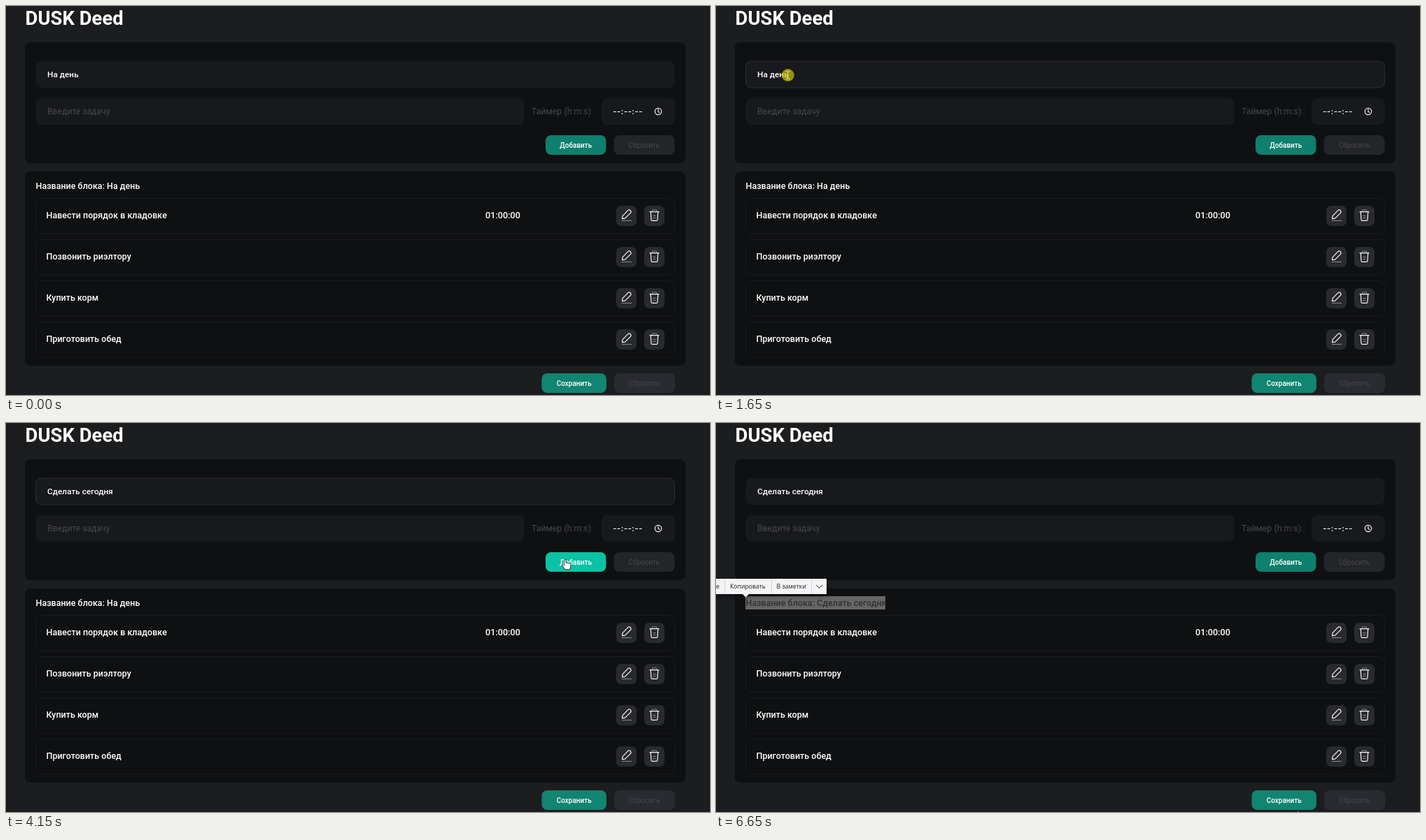
Animation, 1006 px wide and 557 px high, one loop 6.72 s. Source, as an HTML page:

```html
<!DOCTYPE html>
<html lang="ru">
<head>
<meta charset="utf-8">
<title>DUSK Deed</title>
<style>
html, body { margin: 0; width: 100%; height: 100%; overflow: hidden; background: #1c1d1f; }
svg { display: block; width: 100%; height: 100%; }
text { font-family: Roboto, "Noto Sans", sans-serif; font-weight: 500; fill: #fff; white-space: pre; }
.bar text { font-family: "Open Sans", "Noto Sans", sans-serif; font-weight: 400; font-size: 8.7px; fill: #1c1c1c; }
.bar { filter: drop-shadow(0 2px 3px rgba(0, 0, 0, .5)); }
.line { fill: none; stroke: #f4f4f4; stroke-width: 1.2; stroke-linecap: round; stroke-linejoin: round; }
.dim { fill: none; stroke: #8b8c8f; stroke-width: 1; }
</style>
</head>
<body>
<svg id="stage" viewBox="0 0 1006 557"></svg>
<script>
const LOOP = 6720;
const OLD = 'На день', NEW = 'Сделать сегодня';
const stage = document.getElementById('stage');

const rect = (x, y, w, h, fill, r = 8, more = '') =>
  `<rect x="${x}" y="${y}" width="${w}" height="${h}" rx="${r}" fill="${fill}" ${more}/>`;
const text = (x, y, size, str, more = '') =>
  `<text x="${x}" y="${y}" font-size="${size}" ${more}>${str}</text>`;
const button = (x, y, w, h, fill, str, more = '', id = '') =>
  rect(x, y, w, h, fill, 8, id && `id="${id}"`) +
  text(x + w / 2, y + h / 2 + 3.5, 10, str, `text-anchor="middle" ${more}`);

const pencil = x => `<g transform="translate(${x} 286)">${rect(0, 0, 29, 29, '#292a2d', 7)}
  <path class="line" d="M8.6 18.6L9.1 14.7L16.8 6.6Q18.6 5.2 20.4 6.8Q21.9 8.6 20.4 10.3L12.6 18.2Z"/>
  <path class="dim" d="M8 21.4H22"/></g>`;
const bin = x => `<g transform="translate(${x} 286)">${rect(0, 0, 29, 29, '#292a2d', 7)}
  <path class="dim" d="M11.4 8V6H17.6V8M12.5 14.5H16.5M12.5 17.5H16.5"/>
  <path class="line" d="M8 8.6H21M9.3 9L10 20Q10.1 21.4 11.5 21.4H17.5Q18.9 21.4 19 20L19.7 9"/></g>`;
const row = (str, i) => `<g transform="translate(0 ${i * 59})">
  ${rect(42.5, 275.5, 913, 50.5, 'none', 8, 'stroke="#1a1b1d"')}
  ${text(57.5, 304.3, 12.5, str)}${pencil(872)}${bin(912)}</g>`;

const off = 'style="fill:#46474c;font-weight:400"';
stage.innerHTML = `
  ${rect(0, 0, 1006, 557, '#1c1d1f', 0)}
  ${text(27.5, 26.5, 27.5, 'DUSK Deed', 'style="font-weight:700"')}
  ${rect(27, 52, 944, 173, '#0f1011')}
  ${rect(42.5, 79, 913, 38, '#18191c', 8, 'id="field"')}
  ${rect(42.5, 132, 698, 38, '#18191c')}
  ${rect(851, 132, 105, 38, '#18191c')}
  ${rect(59, 91, 44, 14, '#0a5bd0', 0, 'id="fieldSel"')}
  ${text(59, 102, 11.8, OLD, 'id="value"')}
  ${rect(152, 91, 1, 14, '#fff', 0, 'id="caret"')}
  ${text(59, 155.3, 12.2, 'Введите задачу', off)}
  ${text(751, 155.3, 12.4, 'Таймер (h:m:s):', off)}
  ${text(867, 155, 12, '--:--:--', 'style="font-family:Inter,sans-serif" letter-spacing=".3"')}
  <circle class="line" cx="932" cy="151" r="4.7"/><path class="line" d="M932 148V151.2L934 152.4"/>
  ${button(771, 185, 86.5, 28, '#0e806d', 'Добавить', '', 'add')}
  ${button(868.5, 185, 87, 28, '#242529', 'Сбросить', off)}
  ${rect(27, 237, 944, 278, '#0f1011')}
  ${rect(42, 248, 0, 19, '#0a5bd0', 0, 'id="headSel"')}
  ${text(42.5, 261.8, 12.5, '', 'id="head"')}
  ${['Навести порядок в кладовке', 'Позвонить риэлтору', 'Купить корм', 'Приготовить обед'].map(row).join('')}
  ${text(685, 304.3, 12.7, '01:00:00')}
  ${button(765.5, 526, 92.5, 28, '#118571', 'Сохранить', '', 'save')}
  ${button(869, 526, 87, 28, '#2a2b30', 'Сбросить', off)}
  <g id="bar" class="bar">
    ${rect(-40, 223, 198, 22, '#f3f4f5', 0)}
    <path d="M37.5 244.5H47.5L42.5 249.5Z" fill="#f3f4f5"/>
    <path d="M12.5 224V244M79.5 224V244M136.5 224V244" stroke="#d3d4d6"/>
    ${text(5, 237, 8.7, 'Найти в Лумисе', 'text-anchor="end"')}
    ${text(20, 237, 8.7, 'Копировать')}${text(86.5, 237, 8.7, 'В заметки')}
    <path d="M143 231.8L147.5 236.3L152 231.8" fill="none" stroke="#222"/>
  </g>
  <g id="mouse">
    <circle id="press" r="9" fill="#d6ca00" opacity=".68"/>
    <path id="arrow" d="M0 0V11.6L2.7 9.2L4.6 13.3L6.4 12.5L4.6 8.5H8.3Z" fill="#fff" stroke="#111" stroke-width=".6"/>
    <path id="beam" d="M-2.8 -5.8Q0 -5.8 0 -4.6Q0 -5.8 2.8 -5.8M0 -5V5M-2.8 5.8Q0 5.8 0 4.6Q0 5.8 2.8 5.8" fill="none" stroke="#e4e4e4"/>
    <path id="hand" d="M-1.2 1Q0 -.8 1.2 1V5.2Q2.6 4.4 3.4 5.7Q4.8 5 5.6 6.3Q7.6 5.8 7.8 7.6V11Q7.6 13 6.4 14.8H.2Q-1.4 12.2 -4.2 9.3Q-4.4 7.4 -2.6 7.8L-1.2 9Z" fill="#fff" stroke="#111" stroke-width=".8"/>
  </g>`;

const el = {};
stage.querySelectorAll('[id]').forEach(n => el[n.id] = n);
const show = (name, on) => el[name].style.display = on ? '' : 'none';

const within = (t, a, b) => t >= a && t < b;
const inside = ([x, y], l, t, r, b) => x >= l && x < r && y >= t && y < b;
const smooth = u => u * u * (3 - 2 * u);
const easeOut = u => u * (2 - u);
const linear = u => u;

// time, x, y, easing towards the next key
const path = [
  [0, 932, 562, linear], [30, 930, 553, smooth], [690, 137, 224, smooth],
  [730, 137, 224, smooth], [820, 212, 257, linear], [945, -20, 257, smooth],
  [1080, -20, 230, smooth], [1390, 140, 120, smooth], [1420, 140, 120, smooth],
  [1540, 115, 99, smooth], [1600, 115, 99, linear], [1900, 43, 99, smooth],
  [2110, 43, 99, smooth], [2200, 117, 99, smooth], [2480, 236, 116, smooth],
  [2810, 236, 116, smooth], [3110, 267, 129, smooth], [3500, 267, 129, smooth],
  [3890, 799, 195, smooth], [4450, 799, 195, linear], [4600, 540, 291, easeOut],
  [4800, 262, 259, smooth], [4880, 262, 259, linear], [5110, 36, 257, smooth],
  [5540, 36, 257, linear], [5810, 570, 460, easeOut], [6150, 831, 555, linear],
  [LOOP, 831, 555, linear]
];
const presses = [[820, 955], [1570, 2000], [4380, 4450], [4880, 5190]];

function mouseAt(t) {
  const i = path.findIndex((k, n) => t >= k[0] && t < path[n + 1][0]);
  const [t0, x0, y0, ease] = path[i], [t1, x1, y1] = path[i + 1];
  const u = ease((t - t0) / (t1 - t0));
  return [x0 + (x1 - x0) * u, y0 + (y1 - y0) * u];
}

function drawMouse(t) {
  const p = mouseAt(t);
  const down = presses.some(([a, b]) => within(t, a, b));
  const onAdd = inside(p, 771, 185, 857, 213);
  const onSave = inside(p, 766, 526, 858, 554);
  const onText = inside(p, 42, 79, 956, 117) || inside(p, 42, 132, 740, 170) ||
    inside(p, 42, 247, t < 4450 ? 190 : 242, 268);
  const hand = onAdd || onSave;
  const beam = !hand && (onText || down);
  el.mouse.setAttribute('transform', `translate(${p[0]} ${p[1]})`);
  show('press', down);
  show('hand', hand);
  show('beam', beam);
  show('arrow', !hand && !beam);
  el.add.setAttribute('fill', onAdd ? '#0ac2a5' : '#0e806d');
  el.save.setAttribute('fill', onSave ? '#0ac2a5' : '#118571');
}

function drawHead(t) {
  const end = t < 4450 ? 190 : 242;
  const from = within(t, 820, 1570) || t >= 4880
    ? Math.min(end, Math.max(42, mouseAt(t < 4880 ? Math.min(t, 1000) : Math.min(t - 30, 5200))[0]))
    : end;
  const idle = t >= 6650;
  el.head.textContent = 'Название блока: ' + (t < 4450 ? OLD : NEW);
  el.head.style.fill = idle ? '#303132' : '#fff';
  el.headSel.setAttribute('x', from);
  el.headSel.setAttribute('width', end - from);
  el.headSel.setAttribute('fill', idle ? '#666' : '#0a5bd0');
}

function drawField(t) {
  const from = Math.min(103, Math.max(59, mouseAt(Math.min(t, 2000))[0]));
  el.value.textContent = t < 2830 ? OLD : NEW;
  show('fieldSel', within(t, 1600, 2830));
  el.fieldSel.setAttribute('x', from);
  el.fieldSel.setAttribute('width', 103 - from);
  el.field.setAttribute('stroke', within(t, 1570, 4380) ? '#2c2d31' : 'none');
  show('caret', within(t, 3340, 3840) || within(t, 4340, 4380));
}

function drawBar(t) {
  const upper = within(t, 2050, 2830);
  show('bar', upper || within(t, 975, 1570) || t >= 5540);
  el.bar.setAttribute('transform', upper ? 'translate(17 -158)' : '');
}

function draw(t) {
  drawHead(t);
  drawField(t);
  drawBar(t);
  drawMouse(t);
}

const start = performance.now();
function tick() {
  draw((performance.now() - start) % LOOP);
  requestAnimationFrame(tick);
}
tick();
</script>
</body>
</html>
```
